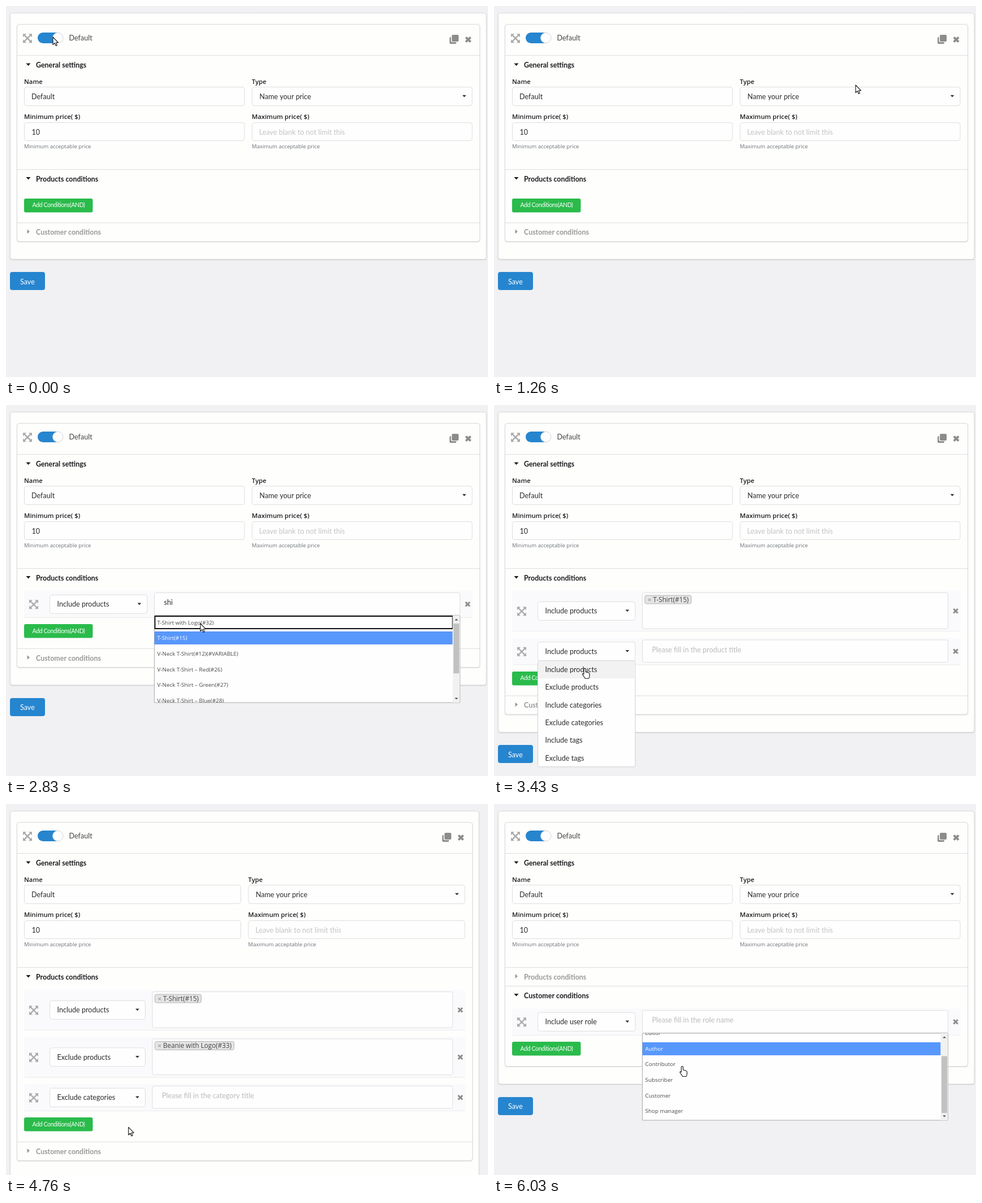
An HTML page with a canvas that plays this animation: 853 by 657 pixels, repeating every 6.1 s.

```html
<!DOCTYPE html>
<html lang="en">
<head>
<meta charset="utf-8">
<title>Pricing rules</title>
<style>
html, body { margin: 0; width: 100%; height: 100%; overflow: hidden; background: #f1f1f3; }
canvas { display: block; }
</style>
</head>
<body>
<canvas id="stage" width="853" height="657"></canvas>
<script>
const g = document.getElementById('stage').getContext('2d');
const LOOP = 6100, STEP = 100 / 3, LAST_STEP = 181;
const LATO = 'Lato, sans-serif', OPEN = '"Open Sans", sans-serif';
const DARK = '#1b1c1d', MUTED = '#999', LINE = '#dededf', BLUE = '#2685cf';
const ROW = 47.5, TALL = 71.5, GAP = 12, ITEM = 27.7;

const SHIRTS = ['T-Shirt with Logo(#32)', 'T-Shirt(#15)', 'V-Neck T-Shirt(#12)(#VARIABLE)',
  'V-Neck T-Shirt – Red(#26)', 'V-Neck T-Shirt – Green(#27)', 'V-Neck T-Shirt – Blue(#28)',
  'Shirt – Green(#29)', 'Shirt(#30)'];
const BEANIES = ['Beanie with Logo(#33)', 'Beanie(#16)'];
const ROLES = ['Administrator', 'Editor', 'Author', 'Contributor', 'Subscriber', 'Customer', 'Shop manager'];
const KINDS = ['products', 'categories', 'tags'].flatMap(k => ['Include ' + k, 'Exclude ' + k]);

// time, x, y, shape shown until the next point
const PATH = [
  [0, 83, 55, 'arrow'], [30, 83, 55, 'arrow'], [300, 790, 58, 'hand'], [360, 790, 58, 'arrow'],
  [480, 700, 300, 'arrow'], [630, 400, 507, 'arrow'], [660, 400, 507, 'arrow'], [800, 804, 345, 'hand'],
  [870, 804, 345, 'arrow'], [1260, 640, 140, 'arrow'], [1300, 640, 140, 'arrow'], [1800, 112, 344, 'hand'],
  [1900, 112, 344, 'arrow'], [2050, 300, 350, 'beam'], [2560, 300, 352, 'arrow'], [2680, 344, 387, 'arrow'],
  [2840, 344, 387, 'arrow'], [2910, 330, 412, 'arrow'], [2950, 330, 412, 'arrow'], [3090, 112, 420, 'hand'],
  [3230, 112, 420, 'arrow'], [3330, 170, 437, 'hand'], [3390, 170, 437, 'hand'], [3480, 150, 500, 'hand'],
  [3530, 150, 500, 'arrow'], [3620, 310, 435, 'beam'], [3850, 310, 435, 'arrow'], [3940, 316, 472, 'hand'],
  [4190, 316, 472, 'arrow'], [4320, 100, 505, 'hand'], [4500, 100, 505, 'arrow'], [4580, 170, 520, 'hand'],
  [4620, 170, 520, 'hand'], [4700, 150, 610, 'hand'], [4740, 150, 610, 'arrow'], [4800, 310, 520, 'beam'],
  [4920, 310, 520, 'arrow'], [4970, 316, 551, 'hand'], [5030, 316, 551, 'arrow'], [5130, 316, 551, 'arrow'],
  [5290, 293, 305, 'hand'], [5340, 293, 305, 'arrow'], [5400, 293, 533, 'beam'], [5430, 293, 533, 'arrow'],
  [5490, 120, 340, 'hand'], [5530, 120, 340, 'arrow'], [5600, 100, 381, 'hand'], [5660, 100, 381, 'arrow'],
  [5750, 320, 383, 'beam'], [5800, 320, 383, 'hand'], [5960, 333, 465, 'hand'], [LOOP, 333, 465, 'hand']
];
const ARROW = new Path2D('M0 0V13.5L3.2 10.6 5.3 15.5 7.4 14.6 5.4 9.8H9.6Z');
const HAND = new Path2D('M-1.6 10V1.2a1.6 1.6 0 0 1 3.2 0V6l5 1.2q2 .6 2 2.6v2.4q0 3-1.6 5.3H.8L-3.6 11q-1-2.4 .8-2Z');

const ramp = (t, a, b) => Math.min(1, Math.max(0, (t - a) / (b - a)));
const during = (t, a, b) => t >= a && t < b;

function text(s, x, y, size, color, font = LATO, weight = 400) {
  g.font = `${weight} ${size}px ${font}`;
  g.fillStyle = color;
  g.fillText(s, x, Math.round(y + size * .36));
}
const body = (s, x, y, color = '#2b2c2d') => text(s, x, y, 12.6, color);
const heading = (s, y, color) => text(s, 53, y, 12.45, color, LATO, 700);

function box(x, y, w, h, r, fill, stroke) {
  g.beginPath();
  g.roundRect(x, y, w, h, r);
  if (fill) { g.fillStyle = fill; g.fill(); }
  if (stroke) { g.strokeStyle = stroke; g.lineWidth = 1; g.stroke(); }
}

function surface(x, y, w, h) {
  g.save();
  g.shadowColor = 'rgba(34,36,38,.22)';
  g.shadowBlur = 2;
  g.shadowOffsetY = 1;
  box(x, y, w, h, 4, '#fefefd');
  g.restore();
  box(x, y, w, h, 4, null, '#d8d9da');
}

function poly(color, ...p) {
  g.beginPath();
  for (let i = 0; i < p.length; i += 2) g.lineTo(p[i], p[i + 1]);
  g.fillStyle = color;
  g.fill();
}
const triDown = (x, y, color, r = 4) => poly(color, x - r, y - r / 2, x + r, y - r / 2, x, y + r * .6);
const triRight = (x, y, color) => poly(color, x - 2, y - 4, x - 2, y + 4, x + 2.5, y);

function rule(y, right) {
  g.fillStyle = LINE;
  g.fillRect(20, y - .5, right - 20, 1);
}

function cross(x, y, r, width) {
  g.beginPath();
  for (const d of [-1, 1]) { g.moveTo(x - r, y - r * d); g.lineTo(x + r, y + r * d); }
  g.lineWidth = width;
  g.strokeStyle = '#8c8c8c';
  g.stroke();
}

function moveIcon(x, y) {
  g.beginPath();
  for (const d of [-1, 1]) { g.moveTo(x - 6, y - 6 * d); g.lineTo(x + 6, y + 6 * d); }
  g.lineWidth = 2.4;
  g.strokeStyle = '#aaa';
  g.stroke();
  for (const a of [-1, 1]) for (const b of [-1, 1])
    poly('#aaa', x + 8 * a, y + 8 * b, x + 2 * a, y + 8 * b, x + 8 * a, y + 2 * b);
}

function cloneIcon(x, y) {
  box(x - 8, y - 4, 12, 12, 2, '#8c8c8c');
  box(x - 5.5, y - 9, 14, 14, 2, '#fefefd');
  box(x - 4, y - 8, 12, 12, 2, '#8c8c8c');
}

function toggle(y) {
  box(56, y - 9.5, 44, 19, 9.5, BLUE);
  g.beginPath();
  g.arc(91.8, y, 9.2, 0, 7);
  g.fillStyle = '#fdfdfd';
  g.fill();
  g.strokeStyle = '#d4d5d6';
  g.lineWidth = 1;
  g.stroke();
}

function select(x, y, w, h, value) {
  box(x, y, w, h, 4, '#fefefe', LINE);
  body(value, x + 13, y + h / 2);
  triDown(x + w - 14, y + h / 2 - .5, '#333', 3.4);
}

function addButton(y, cursor) {
  const over = cursor.x > 32 && cursor.x < 153 && cursor.y > y && cursor.y < y + 24;
  box(32, Math.floor(y), 121.5, 24.5, 3, over ? '#1da53d' : '#2abb4b');
  g.letterSpacing = '-0.35px';
  text('Add Conditions(AND)', 46.5, y + 11.6, 10.5, '#fff');
  g.letterSpacing = '0px';
}

const rowHeight = row => row.chip ? TALL : ROW;
const columns = right => {
  const end = right > 815 ? 250 : 246.5;
  return { end, field: end + 12.5, fieldEnd: right - 21.5 };
};

function conditionRow(row, y, right) {
  const h = rowHeight(row), mid = y + h / 2, c = columns(right);
  g.save();
  g.globalAlpha *= row.open;
  box(32, y, right - 31, h, 4, '#fafafc');
  g.fillStyle = '#ececee';
  g.fillRect(33, y + h - .5, right - 33, 1);
  moveIcon(49, mid + .5);
  select(77.5, mid - 16.5, c.end - 77.5, 33, row.kind);
  box(c.field, y + 3.5, c.fieldEnd - c.field, h - 8, 3, '#fefefe', LINE);
  if (row.chip) {
    g.font = `11.7px ${OPEN}`;
    box(c.field + 4.5, y + 8, g.measureText(row.chip).width + 19, 15, 3, '#e4e4e4', '#b4b4b4');
    text('×', c.field + 9.5, y + 15.8, 11.5, '#888', OPEN);
    text(row.chip, c.field + 19, y + 15.5, 11.7, '#444', OPEN);
    if (row.typed) body(row.typed, c.field + 17, y + 45);
  } else if (row.typed) body(row.typed, c.field + 17, y + 20.5);
  else body(row.hint, c.field + 17, y + 20.5, '#bbb');
  cross(right - 8, mid, 3.8, 3);
  g.restore();
}

const buttonTop = rows => rows.reduce((sum, r) => sum + r.open * (rowHeight(r) + GAP), 39.5)
  + GAP * (1 - (rows.length ? rows[0].open : 0));
const sectionHeight = s => 33 + s.open * (buttonTop(s.rows) + 10);

function section(s, y, right, cursor) {
  rule(y, right + 13);
  const color = s.open > 0 ? DARK : MUTED;
  if (s.expanded) triDown(39.5, y + 15.5, color); else triRight(39.5, y + 15.5, color);
  heading(s.title, y + 17, color);
  if (!s.open) return;
  g.save();
  g.beginPath();
  g.rect(20, y, right - 6, sectionHeight(s));
  g.clip();
  if (s.open < 1) g.globalAlpha = s.open * .5;
  let rowY = y + 39.5 - (1 - s.open) * 5;
  for (const row of s.rows) {
    conditionRow(row, rowY, right);
    rowY += row.open * (rowHeight(row) + GAP);
  }
  addButton(y + buttonTop(s.rows), cursor);
  g.restore();
}

function card(top, headH, name, sections, right, cursor) {
  const h = top + headH, end = right + 13;
  const bottom = h + 202 + sections.reduce((sum, s) => sum + sectionHeight(s), 0);
  surface(19.5, top, end - 19, bottom - top);
  const mid = top + (name ? 24 : 16);
  moveIcon(38, mid + .7);
  toggle(mid);
  text(name, 111.5, mid, 12.6, '#444');
  cloneIcon(right - 32, top + 26.5);
  cross(right - 7, top + 27, 4.2, 3.8);
  rule(h, end);

  triDown(39.5, h + 16, DARK);
  heading('General settings', h + 17, DARK);
  const w = (right - 45) / 2, x2 = 45 + w;
  const label = (s, x, y) => text(s, x, h + y, 11.3, DARK, OPEN, 600);
  const note = (s, x) => text(s, x, h + 161, 9.6, '#6a6f77', OPEN);
  label('Name', 32, 46.5);
  label('Type', x2, 46.5);
  label('Minimum price( $)', 32, 108.5);
  label('Maximum price( $)', x2, 108.5);
  box(32.5, h + 56, w - .5, 33, 4, '#fefefe', LINE);
  body(name, 45, h + 73);
  select(x2 + .5, h + 56, w - .5, 33, 'Name your price');
  box(32.5, h + 119, w - .5, 32, 4, '#fefefe', LINE);
  body('10', 45.5, h + 136);
  box(x2 + .5, h + 119, w - .5, 32, 4, '#fefefe', LINE);
  body('Leave blank to not limit this', x2 + 13, h + 136, '#c4c4c5');
  note('Minimum acceptable price', 32);
  note('Maximum acceptable price', x2);

  let y = h + 202;
  for (const s of sections) {
    section(s, y, right, cursor);
    y += sectionHeight(s);
  }
}

function list(x, y, items, { width = 541, active = -1, focus = -1, scroll = 0 } = {}) {
  const total = items.length * ITEM, h = Math.min(154, total + .6), long = total > h + 1;
  const inner = width - (long ? 13 : 0);
  box(x, y, width, h, 0, '#fefefe', '#aaa');
  g.save();
  g.beginPath();
  g.rect(x, y, width, h);
  g.clip();
  items.forEach((item, i) => {
    const mid = y + 12 + i * ITEM - scroll, top = Math.round(mid - 11.5);
    if (i === active) {
      g.fillStyle = '#5897fb';
      g.fillRect(x, top, inner, 23);
    }
    if (i === focus) {
      g.strokeStyle = '#111';
      g.lineWidth = 2;
      g.strokeRect(x + 1, top, inner - 1, 22);
    }
    text(item, x + 5, mid, 9.85, i === active ? '#fff' : '#4a4a4a', OPEN);
  });
  if (long) {
    g.fillStyle = '#f1f1f1';
    g.fillRect(x + inner, y, 13, h);
    g.fillStyle = '#c1c1c1';
    g.fillRect(x + inner + 1.5, y + 14 + 127 * scroll / total, 10, 127 * h / total);
    const ax = x + inner + 6.5;
    poly('#505050', ax - 3, y + 8.5, ax + 3, y + 8.5, ax, y + 5.5);
    poly('#505050', ax - 3, y + h - 8.5, ax + 3, y + h - 8.5, ax, y + h - 5.5);
  }
  g.restore();
}

function kindMenu(y, right, active) {
  const w = columns(right).end - 77.5;
  box(77.5, y, w, KINDS.length * 31.3, 3, '#fefefe', '#cfd0d2');
  KINDS.forEach((k, i) => {
    if (i === active) {
      g.fillStyle = '#f2f2f2';
      g.fillRect(78, y + i * 31.3 + .5, w - 1, 30.5);
    }
    body(k, 90.5, y + i * 31.3 + 15.5);
  });
}

function cursorAt(t) {
  const i = PATH.findLastIndex(p => p[0] <= t);
  const [from, x, y, shape] = PATH[i], [to, x2, y2] = PATH[i + 1];
  const k = ramp(t, from, to), e = k * k * (3 - 2 * k);
  return { x: x + (x2 - x) * e, y: y + (y2 - y) * e, shape };
}

function drawCursor({ x, y, shape }) {
  g.save();
  g.translate(x, y);
  if (shape === 'beam') {
    g.fillStyle = '#111';
    g.fillRect(-.5, -6, 1.2, 12);
    g.fillRect(-3, -6.5, 6, 1.2);
    g.fillRect(-3, 5.5, 6, 1.2);
  } else {
    const p = shape === 'hand' ? HAND : ARROW;
    g.fillStyle = '#fff';
    g.fill(p);
    g.strokeStyle = '#111';
    g.lineWidth = 1.1;
    g.lineJoin = 'round';
    g.stroke(p);
  }
  g.restore();
}

// Letters appear one by one between start and end; the field is cleared at stop.
const typed = (t, word, start, end, stop) =>
  t < stop ? word.slice(0, Math.ceil(ramp(t, start, end) * word.length)) : '';

function conditions(t) {
  const hint = 'Please fill in the product title';
  const rows = [
    { open: ramp(t, 1870, 1905), kind: KINDS[0], hint, typed: typed(t, 'shi', 2280, 2500, 2930),
      chip: t >= 2930 && 'T-Shirt(#15)' },
    { open: ramp(t, 3170, 3204), kind: KINDS[t < 3510 ? 0 : 1], hint, typed: typed(t, 'bea', 3680, 3820, 4190),
      chip: t >= 4130 && 'Beanie with Logo(#33)' },
    { open: ramp(t, 4390, 4425), kind: KINDS[t < 4720 ? 0 : 3], hint: t < 4720 ? hint : 'Please fill in the category title',
      typed: typed(t, 'clo', 4820, 4900, 5000), chip: t >= 5000 && 'Clothing' }
  ].filter(r => r.open > 0);
  const role = { open: ramp(t, 5630, 5680), kind: 'Include user role', hint: 'Please fill in the role name' };
  return [
    { title: 'Products conditions', rows, open: 1 - ramp(t, 5350, 5479), expanded: t < 5350 },
    { title: 'Customer conditions', rows: role.open ? [role] : [], open: ramp(t, 5505, 5570), expanded: t >= 5505 }
  ];
}

function popups(t, right) {
  const wait = ['Please enter 3 or more characters'];
  if (during(t, 2120, 2600)) list(262.5, 373, wait);
  if (during(t, 2600, 2930)) list(262.5, 373, SHIRTS, { active: t < 2700 ? 0 : 1, focus: 0 });
  if (during(t, 3370, 3510)) kindMenu(453, right, t < 3450 ? 0 : 1);
  if (during(t, 3650, 3870)) list(262.5, 456.5, wait);
  if (during(t, 3870, 4190)) list(262.5, 456.5, BEANIES, { active: t < 4130 ? 0 : 1, focus: 0 });
  if (during(t, 4600, 4720)) kindMenu(536.5, right, t < 4660 ? 0 : 3);
  if (during(t, 4810, 4920)) list(259.5, 540, wait, { width: 531 });
  if (during(t, 4920, 5000)) list(259.5, 540, ['Clothing'], { width: 531, active: 0 });
  if (t >= 5770) {
    const k = ramp(t, 5860, 5960);
    list(262.5, 406, ROLES, { active: Math.round(k * 2), focus: 0, scroll: 40.4 * k });
  }
}

function draw(t) {
  const cursor = cursorAt(t), sections = conditions(t);
  const two = during(t, 330, 870), scroll = two ? 118 * ramp(t, 450, 600) : 0;
  const firstEnd = 289.5 + sections.reduce((sum, s) => sum + sectionHeight(s), 0);
  const bottom = (two ? firstEnd + 18.5 + 41 + 329.5 : firstEnd) + 31.5;
  const save = bottom + 23;
  const right = save + 31.5 > 657 ? 812 : 825;

  g.fillStyle = '#f1f1f3';
  g.fillRect(0, 0, 853, 657);
  g.save();
  g.translate(0, -scroll);
  surface(7.5, 12.5, right + 17.5, bottom - 12.5);
  const page = { x: cursor.x, y: cursor.y + scroll };
  card(32.5, 55, 'Default', sections, right, page);
  if (two) card(firstEnd + 18.5, 41, '', sections, right, page);
  box(7, Math.floor(save), 62, 32, 4, BLUE);
  body('Save', 25, save + 16.5, '#fff');
  g.restore();
  popups(t, right);
  drawCursor(cursor);
}

const stepped = t => Math.min(LAST_STEP, Math.floor((t + 9.9) / STEP)) * STEP;

const start = performance.now();
function tick() {
  draw(stepped((performance.now() - start) % LOOP));
  requestAnimationFrame(tick);
}
tick();
</script>
</body>
</html>
```
